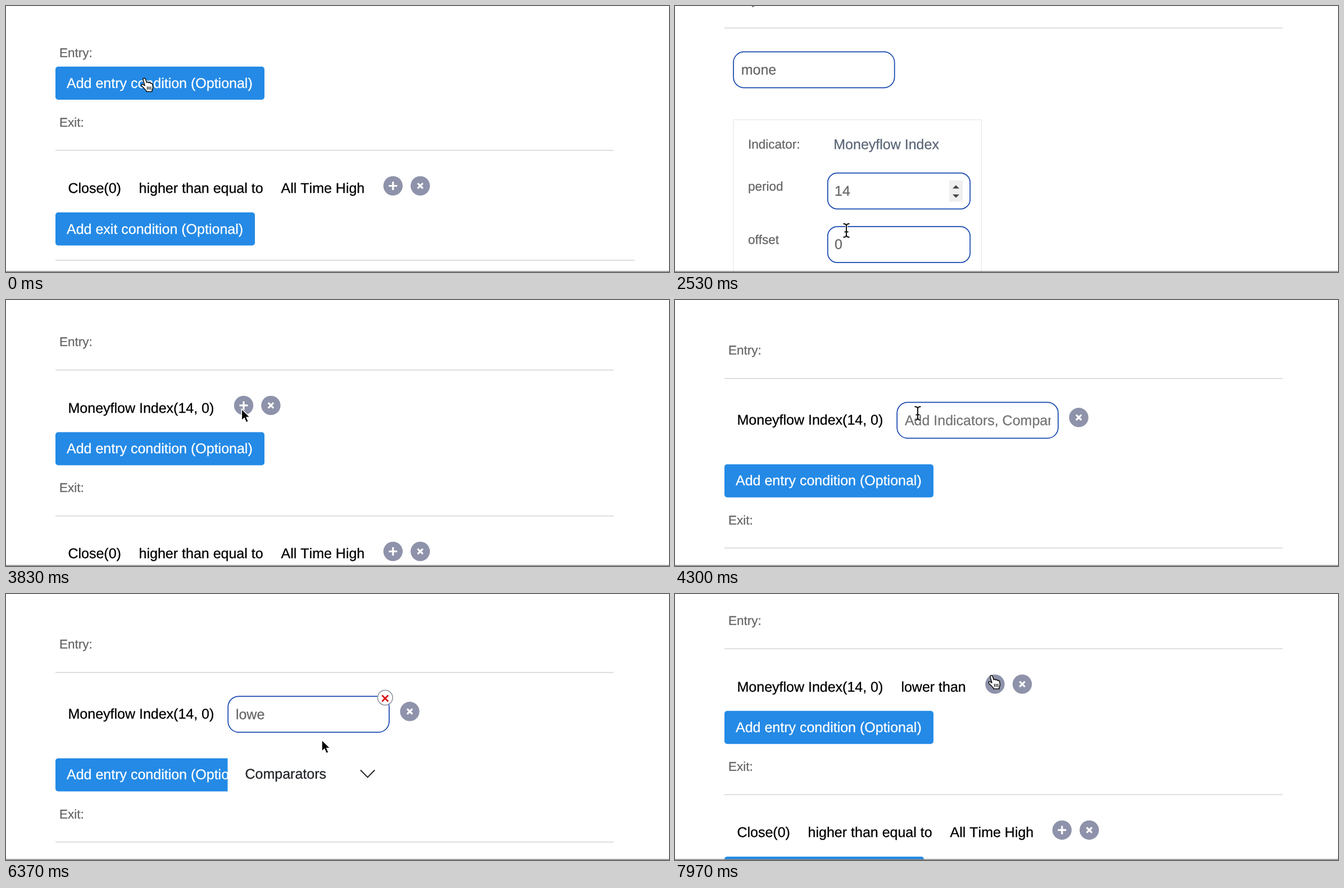
These frames come from a looping animation (1180x474 px, 8000 ms). An HTML page:

```html
<!DOCTYPE html>
<html lang="en">
<head>
<meta charset="utf-8">
<title>Strategy conditions</title>
<style>
  html, body { margin: 0; width: 100%; height: 100%; overflow: hidden; background: #fff; }
  #stage { display: block; width: 1180px; height: 474px; }
  text {
    font: 25px "Liberation Sans", Arial, sans-serif;
    font-kerning: none;
    text-rendering: geometricPrecision;
    white-space: pre;
    color: #000;
    fill: currentColor;
    stroke: currentColor;
    stroke-width: .3;
  }
  .label { font-size: 22.5px; color: #666; }
  .typed { color: #666; }
  .hint { color: #757575; }
  .menu { color: #212529; }
  .title { color: #5b6777; }
  .light { color: #fff; fill: #fff; }
  .blue { fill: #248ae6; }
  .field { fill: #fff; stroke: #1546ae; stroke-width: 1.7; }
  .rule { stroke: #d4d4d4; stroke-width: 1.4; }
  .dot { fill: #8e92aa; }
  .mark { stroke: #fff; stroke-width: 3.2; }
  .line { fill: none; stroke: #212529; stroke-width: 2; }
</style>
</head>
<body>
<svg id="stage" viewBox="0 0 1180 474"></svg>
<script>
const LOOP = 8000;
const stage = document.getElementById('stage');

// Drawing helpers
const text = (x, y, s, cls = '') => `<text x="${x}" y="${y}" class="${cls}">${s}</text>`;
const rect = (x, y, w, h, cls, r = 0) =>
  `<rect x="${x}" y="${y}" width="${w}" height="${h}" rx="${r}" class="${cls}"/>`;
const path = (d, cls) => `<path d="${d}" class="${cls}"/>`;
const rule = (y, end = 1081.5) => path(`M88 ${y}H${end}`, 'rule');
const during = (from, to, body) => `<g data-from="${from}" data-to="${to}">${body}</g>`;
const button = (y, w, s) => rect(88, y, w, 59, 'blue', 5) + text(108, y + 37.8, s, 'light');
const dot = (x, y, mark) => `<circle cx="${x}" cy="${y}" r="17.2" class="dot"/>` + path(mark, 'mark');
const plus = (x, y) => dot(x, y, `M${x - 7.5} ${y}h15M${x} ${y - 7.5}v15`);
const cross = (x, y) =>
  dot(x, y, `M${x - 4.7} ${y - 4.7}l9.4 9.4m0 -9.4l-9.4 9.4`);

const badge = x => `<circle cx="${x}" cy="178.4" r="13.3" fill="#fff" stroke="#8b8f9e" stroke-width="1.5"/>
  <path d="M${x - 5.5} 174.3l11 11m0 -11l-11 11" stroke="#dc1414" stroke-width="2.8"/>`;

const search = (id, x) => rect(x, 176, 286.7, 64, 'field', 19) +
  `<svg x="${x + 12}" y="177" width="261.5" height="62">
    <text id="${id}" x="1.7" y="39.3"></text>
    <rect id="${id}Caret" y="17" width="1.5" height="28" fill="#222"/>
  </svg>`;

const menu = (x, w, s) => rect(x, 255, w, 105, 'light') + text(x + 31, 322.5, s, 'menu') +
  path(`M${x + w - 60} 307.5l12.6 12.8l12.6 -12.8`, 'line');
const choice = (x, w, s) => rect(x, 355, w, 82, 'light') + text(x + 31, 400, s, 'menu');

const numberField = (y, n) => rect(271.8, y, 253.4, 64, 'field', 17) + text(284, y + 40, n, 'typed');
const spinner = '<path d="M488 405h24v38h-24z" fill="#efefef"/>' +
  '<path d="M494 419.5l6 -6l6 6zM494 430l6 6l6 -6z" fill="#444"/>';

const panel = `<rect x="103.8" y="297" width="441.7" height="400" fill="#fff" stroke="#e6e6e6" stroke-width="1.2"/>` +
  text(130, 348, 'Indicator:', 'label') + text(282.3, 349, 'Moneyflow Index', 'title') +
  text(130, 423, 'period', 'label') + numberField(392, '14') + during(1700, 2640, spinner) +
  text(130, 518, 'offset', 'label') + numberField(487.4, '0');

// Key moments
const OPEN1 = 200, PICK1 = 1700, SUBMIT = 3050, OPEN2 = 4080, PICK2 = 7110;

const below = button(108, 372, 'Add entry condition (Optional)') +
  text(95, 215, 'Exit:', 'label') + rule(257.3) +
  text(110.4, 333, 'Close(0)') + text(236.6, 333, 'higher than equal to') + text(489.6, 333, 'All Time High') +
  plus(688.8, 320.5) + cross(737.3, 320.5) +
  button(367.7, 355, 'Add exit condition (Optional)') + rule(453, 1119);

// An open search field sets the row's text lower
const rowText = y => text(110.5, y, 'Moneyflow Index(14, 0)');

const arrow = `<path d="M0 0V20.5L4.8 16.2L8.2 24L12 22.3L8.8 14.7H15Z" fill="#000" stroke="#fff" stroke-width="1.5"/>`;
const beamPath = 'M-5.5 -12Q0 -12 0 -8Q0 -12 5.5 -12M0 -8V8M-5.5 12Q0 12 0 8Q0 12 5.5 12M-3.5 2.5H3.5';
const beam = ['#fff" stroke-width="4', '#111" stroke-width="2']
  .map(s => `<path d="${beamPath}" fill="none" stroke="${s}"/>`).join('');
const hand = `<g transform="translate(-7 -.5)" stroke="#111" stroke-width="1.6" stroke-linejoin="round">
  <path fill="#fff" d="M5 4C4 1 8.3 0 9.3 2.8L11.4 9C12 7.4 14.5 7.6 15 9.4C16 8.2 18 8.7 18.4 10.5
    C19.8 9.8 21.5 10.7 21.8 12.5L22.4 17C22.6 19 22 20.5 21 22V25H11L10.4 23C8 21 6 18 3 15.6
    C.8 13.4 2.8 11.3 5 12.4L8 14.3Z"/>
  <path d="M12.6 16v5.5M15.6 16v5.5M18.6 16v5.5" stroke-width="1.4"/></g>`;

stage.innerHTML = `<rect width="1180" height="474" fill="#fff"/>
  <g id="page">
    ${text(95, 91, 'Entry:', 'label')}
    <g id="below">${below}</g>
    ${during(OPEN1, LOOP, rule(133.5))}
    ${during(OPEN1, SUBMIT, search('first', 104))}
    ${during(OPEN1, PICK1, cross(427, 203))}
    ${during(640, PICK1, menu(103.5, 272.3, 'Indicators'))}
    ${during(1400, PICK1, choice(103.5, 272.3, 'Moneyflow Index'))}
    ${during(640, 1660, badge(383.5))}
    ${during(PICK1, SUBMIT, panel)}
    ${during(SUBMIT, OPEN2, rowText(209.5) + plus(423, 196.6) + cross(471.4, 196.6))}
    ${during(OPEN2, PICK2, rowText(216.2) + search('second', 395.2) + cross(718.6, 203))}
    ${during(5640, PICK2, menu(394.5, 296.5, 'Comparators') + badge(674.8))}
    ${during(6680, PICK2, choice(394.5, 296.5, 'lower than'))}
    ${during(PICK2, LOOP, rowText(209.5) + text(402.4, 209.5, 'lower than') +
      plus(569.5, 196.6) + cross(618, 196.6))}
  </g>
  <path d="M0 473H1180" stroke="#858585" stroke-width="1.6"/>
  <g id="pointer">
    <g data-kind="arrow">${arrow}</g><g data-kind="beam">${beam}</g><g data-kind="hand">${hand}</g>
  </g>`;

const $ = id => document.getElementById(id);
const windows = [...stage.querySelectorAll('[data-from]')];
const kinds = [...stage.querySelectorAll('[data-kind]')];

const scroll = [[0, 0], [2300, 0], [2530, 94], [2880, 200], [3150, 200], [3600, 79.5],
  [3880, -6.3], [7250, -6.3], [7650, 36]];
const shift = [[0, 0], [OPEN1, 178.4], [PICK1, 640], [SUBMIT, 136.2], [OPEN2, 178.4], [PICK2, 136.2]];

// Time, x, y and the pointer shape until the next stop
const moves = [
  [0, 246, 128, 'hand'], [OPEN1, 246, 128, 'arrow'], [300, 247, 176, 'beam'], [450, 250, 205, 'beam'],
  [640, 250, 205, ''], [1120, 250, 205, 'beam'], [1220, 285, 270, 'hand'], [1360, 310, 318, 'hand'],
  [1450, 310, 318, 'hand'], [1640, 305, 400, 'hand'], [PICK1, 305, 400, 'beam'],
  [2600, 305, 400, 'arrow'], [2920, 360, 300, 'hand'], [SUBMIT, 360, 300, 'arrow'],
  [3500, 360, 162, 'arrow'], [3620, 360, 162, 'arrow'], [3900, 430, 200, 'hand'],
  [OPEN2, 430, 200, 'beam'], [4200, 432, 202, 'beam'], [4800, 432, 202, 'arrow'],
  [5200, 750, 390, 'arrow'], [5580, 560, 240, 'arrow'], [5640, 560, 240, ''],
  [6270, 560, 240, 'arrow'], [6370, 562, 260, 'arrow'], [6400, 562, 260, 'arrow'],
  [6600, 590, 322, 'hand'], [6700, 590, 322, 'hand'], [6980, 505, 393, 'hand'],
  [PICK2, 505, 393, 'arrow'], [7400, 505, 393, 'arrow'], [7840, 562, 148, 'hand'], [7930, 563, 144.5, 'hand']
];

const fields = [
  { id: 'first', word: 'mone', keys: [640, 780, 930, 1080], focus: [450, 1400] },
  { id: 'second', word: 'lowe', keys: [5640, 5710, 5780, 5850], focus: [4760, 6650] }
];

function segment(track, t) {
  let i = track.length - 1;
  while (i && track[i][0] > t) i--;
  const a = track[i], b = track[i + 1] || a;
  return { a, b, p: b === a ? 0 : (t - a[0]) / (b[0] - a[0]) };
}
const mix = (a, b, p) => a + (b - a) * p;
const show = (el, on) => el.setAttribute('display', on ? 'inline' : 'none');

function type({ id, word, keys, focus }, t) {
  const count = keys.filter(k => k <= t).length;
  const el = $(id), caret = $(id + 'Caret');
  el.textContent = count ? word.slice(0, count) : 'Add Indicators, Comparators';
  el.setAttribute('class', count ? 'typed' : 'hint');
  caret.setAttribute('x', count ? 2 + el.getComputedTextLength() : 1);
  const since = t - (count ? keys[count - 1] : focus[0]);
  show(caret, t >= focus[0] && t < focus[1] && since % 1000 < 500);
}

function draw(t) {
  const s = segment(scroll, t);
  $('page').setAttribute('transform', `translate(0 ${-mix(s.a[1], s.b[1], s.p)})`);
  $('below').setAttribute('transform', `translate(0 ${segment(shift, t).a[1]})`);
  windows.forEach(w => show(w, t >= +w.dataset.from && t < +w.dataset.to));
  fields.forEach(f => type(f, t));

  const { a, b, p } = segment(moves, t);
  const q = p * p * (3 - 2 * p);
  $('pointer').setAttribute('transform', `translate(${mix(a[1], b[1], q)} ${mix(a[2], b[2], q)})`);
  kinds.forEach(k => show(k, k.dataset.kind === a[3]));
}

const start = performance.now();
function tick() {
  draw((performance.now() - start) % LOOP);
  requestAnimationFrame(tick);
}
tick();
</script>
</body>
</html>
```
